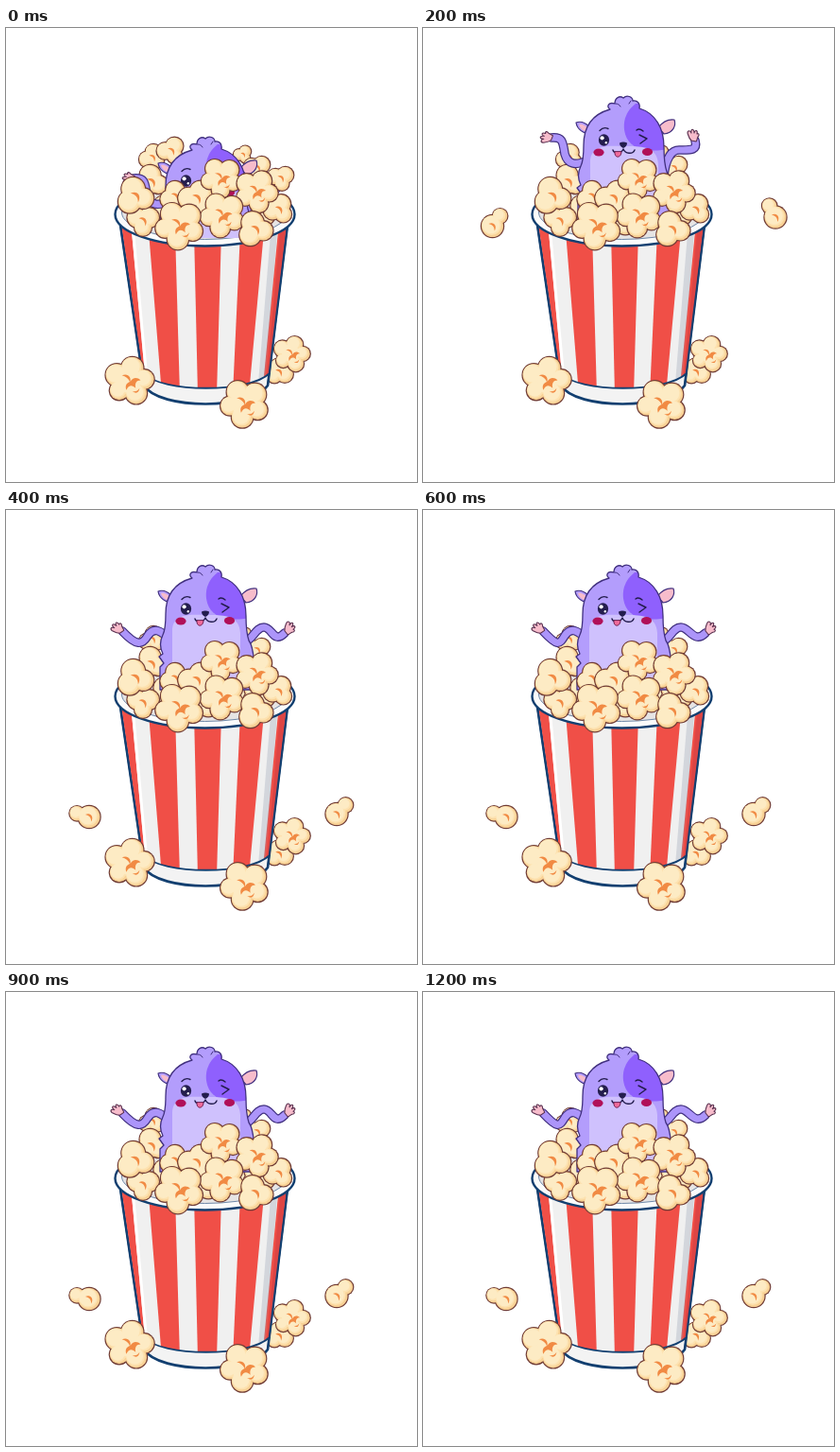
Animation of 435 by 480 pixels, one loop 1.3 s. Source, as an HTML page:

```html
<!DOCTYPE html>
<html lang="en">
<head>
<meta charset="utf-8">
<title>Popcorn hamster</title>
<style>
html, body { margin: 0; width: 100%; height: 100%; overflow: hidden; background: #fff; }
svg { display: block; width: 435px; height: 480px; }
</style>
</head>
<body>
<svg viewBox="0 0 435 480" fill="none" stroke-linecap="round" stroke-linejoin="round">
  <defs>
    <clipPath id="tub"><path d="M121 200L145 365C165 386 258 386 279 365L298 200Z"/></clipPath>
    <clipPath id="inside"><path d="M0 0H435V222H0Z"/></clipPath>
    <path id="shape" d="M169 110C169 90 179 77 197 72C193 69 195 64 202 66C202 60 207 57 211 60C215 56 221 59 221 63C226 62 229 66 228 71C245 76 254 92 254 112C254 126 255 132 257 138C263 146 263 166 263 190H163V166L167 162L162 155L166 152C162 144 163 138 166 132C169 126 169 118 169 110Z"/>
    <clipPath id="skin"><use href="#shape"/></clipPath>
    <g id="hand" stroke="#59304f" stroke-width="1.1" fill="#f7bccb">
      <path d="M-2 4C-5 1 -5 -1 -6 -4C-6 -7 -3 -7 -2 -4C-3 -9 1 -9 1 -4C2 -8 5 -7 4 -3C6 -4 7 -2 5 0C4 2 4 4 3 5Z"/>
    </g>
  </defs>

  <g id="floorBack"></g>

  <path d="M121 208L146 378C162 404 260 404 277 378L298 208Z" fill="#f3f3f3" stroke="#123f70" stroke-width="2.6"/>
  <g clip-path="url(#tub)">
    <path d="M115 200H305V392H115Z" fill="#f04f47"/>
    <g id="stripes" fill="#f0f0f0"></g>
    <path d="M136 215L152 388H149L133 215Z" fill="#fff"/>
    <path d="M291 205H300L281 388H274Z" fill="#902238" opacity=".2"/>
    <path d="M281 205H288L273 388H266Z" fill="#8894a8" opacity=".28"/>
  </g>
  <path d="M121 208L146 378M277 378L298 208M145 365C165 386 258 386 279 365" stroke="#123f70" stroke-width="1.8"/>
  <ellipse cx="210.5" cy="197" rx="95" ry="33.5" fill="#fbfbfb" stroke="#123f70" stroke-width="2.4"/>
  <ellipse cx="210.5" cy="195" rx="88" ry="28.5" fill="#e6e4e4" stroke="#6f88a8" stroke-width="1"/>

  <g id="back"></g>
  <g id="flyLeft"></g>

  <g clip-path="url(#inside)">
    <g id="hamster">
      <g id="arms"></g>
      <g stroke="#41307f" stroke-width="1.2">
        <path d="M176 98C169 98 162 93 161 86C166 84 172 87 176 91Z" fill="#b39dfc"/>
        <path d="M174 96C169 96 165 92 164 88C168 87 172 90 174 93Z" fill="#f7bccb" stroke="none"/>
        <path d="M248 91C253 85 259 82 265 83C267 89 264 97 254 98Z" fill="#f7bccb"/>
      </g>
      <use href="#shape" fill="#b39dfc"/>
      <g clip-path="url(#skin)">
        <path d="M224 66C211 76 209 91 215 103C221 114 238 119 262 113V66Z" fill="#8f60fd"/>
        <path d="M176 192V128C176 108 198 111 211 111C228 111 247 110 248 130V192Z" fill="#cfc1fd"/>
      </g>
      <use href="#shape" stroke="#41307f" stroke-width="1.3"/>
      <path d="M203 66C205 66 207 67 208 69M219 63L217 66" stroke="#41307f"/>
      <ellipse cx="185" cy="117.5" rx="5.6" ry="4" fill="#b01058"/>
      <ellipse cx="236.5" cy="117" rx="5.6" ry="4" fill="#b01058"/>
      <ellipse cx="190.5" cy="104.5" rx="5.6" ry="6.2" fill="#241d4e"/>
      <circle cx="188.6" cy="102.3" r="2.1" fill="#fff"/>
      <circle cx="192.8" cy="107.3" r="1.2" fill="#fff"/>
      <g stroke="#241d4e" stroke-width="1.4">
        <path d="M186 94.5Q190 90 195 92.5M225 94Q228 91.5 232 95M228 99L236 103L229 108"/>
        <path d="M200 115C201 119 209 119 211 114C213 119 221 120 223 115"/>
      </g>
      <path d="M202 117C201 124 209 124 209 117Z" fill="#ef6a9a" stroke="#6b1f50"/>
      <path d="M207 107.5Q211 105.5 215 107.5Q215 111 211 113Q207 111 207 107.5Z" fill="#241d4e"/>
    </g>
  </g>

  <g id="flyRight"></g>
  <g id="front"></g>
</svg>

<script>
const $ = id => document.getElementById(id);

// lobe count, distance, radii, core radius (all relative to the size)
const KINDS = {
  flower: { n: 5, dist: .57, r: [.47, .41, .45, .4, .47], core: .62 },
  clump: { n: 3, dist: .42, r: [.64, .56, .62], core: .6 },
  puff: { n: 1, dist: 1.12, r: [.68], core: 1 }
};
const MARKS = {
  flower: '<path d="M-.32 -.24C-.05 -.34 .06 -.14 .02 .02C.12 -.16 .3 -.18 .44 -.04C.26 -.04 .2 .08 .24 .28C.1 .14 -.04 .14 -.14 .36C-.2 .18 -.14 .08 0 .02C-.06 -.12 -.16 -.2 -.32 -.24Z"/><path d="M.1 .4Q.28 .46 .4 .28Q.34 .58 .1 .4Z"/>',
  small: '<path d="M-.26 -.16C.06 -.34 .36 -.06 .14 .32C.14 .06 .02 -.1 -.26 -.16Z"/>'
};

function kernel([kind, x, y, size, turn]) {
  const k = KINDS[kind];
  const wide = kind === 'puff' ? 1 : 1.05;
  const lobes = [[x, y, k.core * size]];
  for (let i = 0; i < k.n; i++) {
    const a = (turn + i * 360 / k.n) * Math.PI / 180;
    const d = k.dist * size;
    lobes.push([x + Math.cos(a) * d * wide, y + Math.sin(a) * d / wide, k.r[i] * size]);
  }
  const layer = (grow, shift, fill) => `<g fill="${fill}">` + lobes.map(([cx, cy, r]) =>
    `<circle cx="${(cx - shift).toFixed(1)}" cy="${(cy - shift).toFixed(1)}" r="${(r + grow).toFixed(1)}"/>`).join('') + '</g>';
  const u = kind === 'puff' ? size * 1.3 : size;
  return layer(.7, 0, '#703c35') + layer(-.5, 0, '#f8d195') +
    layer(-1.6, .9, '#fde2b0') + layer(-2.8, 1.5, '#fdebc4') +
    `<g transform="translate(${x} ${y}) scale(${u})" fill="#f18a43">${MARKS[kind] || MARKS.small}</g>`;
}

const pile = list => list.map(kernel).join('');

$('floorBack').innerHTML = pile([
  ['clump', 289, 364, 14.5, 20],
  ['flower', 302.5, 345, 19.5, -75]
]);
$('back').innerHTML = pile([
  ['clump', 251, 134, 10, -60],
  ['clump', 155, 137, 14, -80],
  ['clump', 266, 148, 14, -40],
  ['clump', 172, 195, 19, 0],
  ['clump', 210, 200, 19, 60],
  ['clump', 245, 188, 19, 30],
  ['clump', 266, 196, 18, 10],
  ['clump', 154, 163, 18, -100]
]);
$('front').innerHTML = pile([
  ['clump', 179, 178, 16, -90],
  ['clump', 145, 204, 17, -30],
  ['clump', 202, 180, 19, -60],
  ['clump', 137, 178, 20, -105],
  ['flower', 228, 159, 22, -50],
  ['clump', 289, 192, 16, -70],
  ['flower', 265, 173, 23, -65],
  ['flower', 229, 198, 24, -45],
  ['clump', 264, 213, 19, -110],
  ['flower', 183.5, 209, 26, -48],
  ['flower', 131, 373.5, 26, -80],
  ['flower', 252.5, 397.5, 26, -45]
]);

$('stripes').innerHTML = [
  [133, 151, 149, 165], [179, 199, 184, 203], [228, 248, 223, 240], [273, 288, 257, 271]
].map(([a, b, c, d]) => `<path d="M${a} 215H${b}L${d} 388H${c}Z"/>`).join('');

// each arm: path, then hand x, y, angle
const RAISED = [
  ['M173 126C160 132 152 130 149 119C147 106 147 101 135 102', 131, 102, -80],
  ['M254 142C256 124 262 115 270 115C282 115 290 116 287 105', 285, 101, 0]
];
const spread = dx => [
  [`M173 138C164 126 156 124 150 133C144 143 ${138 + dx} 144 ${123 + dx} 128`, 119 + dx, 126, -45],
  [`M252 140C262 137 264 124 273 124C282 124 ${283 + dx} 142 ${295 + dx} 130`, 299 + dx, 126, 40]
];
const OPEN = spread(0), SWAY = spread(4);

const drawArm = ([d, x, y, a]) =>
  `<path d="${d}" stroke="#41307f" stroke-width="9.6"/><path d="${d}" stroke="#ac95fa" stroke-width="7.2"/>` +
  `<use href="#hand" transform="translate(${x} ${y}) rotate(${a})"/>`;

// hamster x, y, arms, left flyer and right flyer
const LAND_L = ['puff', 88, 324.5, 12, -164];
const LAND_R = ['puff', 350, 321.5, 12, -45];
const POSES = [
  [0, 57, RAISED, ['clump', 175, 130, 15, -60], ['clump', 291, 159, 14, -40]],
  [1, 34, RAISED, ['puff', 103, 164, 12, -35], ['puff', 344, 160, 12, -140]],
  [1, 14, RAISED, ['puff', 73.5, 209.5, 12, -53], ['puff', 373, 200, 12, -118]],
  [1, -13, RAISED, ['puff', 72, 261.5, 13, -90], ['puff', 372, 258.5, 13, -86]],
  [0, 0, OPEN, LAND_L, LAND_R],
  [0, 0, SWAY, LAND_L, LAND_R]
];
const STEPS = [0, 1, 2, 3, 4, 4, 5, 4, 5, 4, 5, 4, 5];
const STEP = 100;
let shown = -1;

function show(i) {
  if (i === shown) return;
  shown = i;
  const [x, y, arms, left, right] = POSES[i];
  $('hamster').setAttribute('transform', `translate(${x} ${y})`);
  $('arms').innerHTML = arms.map(drawArm).join('');
  $('flyLeft').innerHTML = kernel(left);
  $('flyRight').innerHTML = kernel(right);
}

const start = performance.now();
function tick() {
  const t = (performance.now() - start) % (STEPS.length * STEP);
  show(STEPS[Math.floor(t / STEP)]);
  requestAnimationFrame(tick);
}
tick();
</script>
</body>
</html>
```
